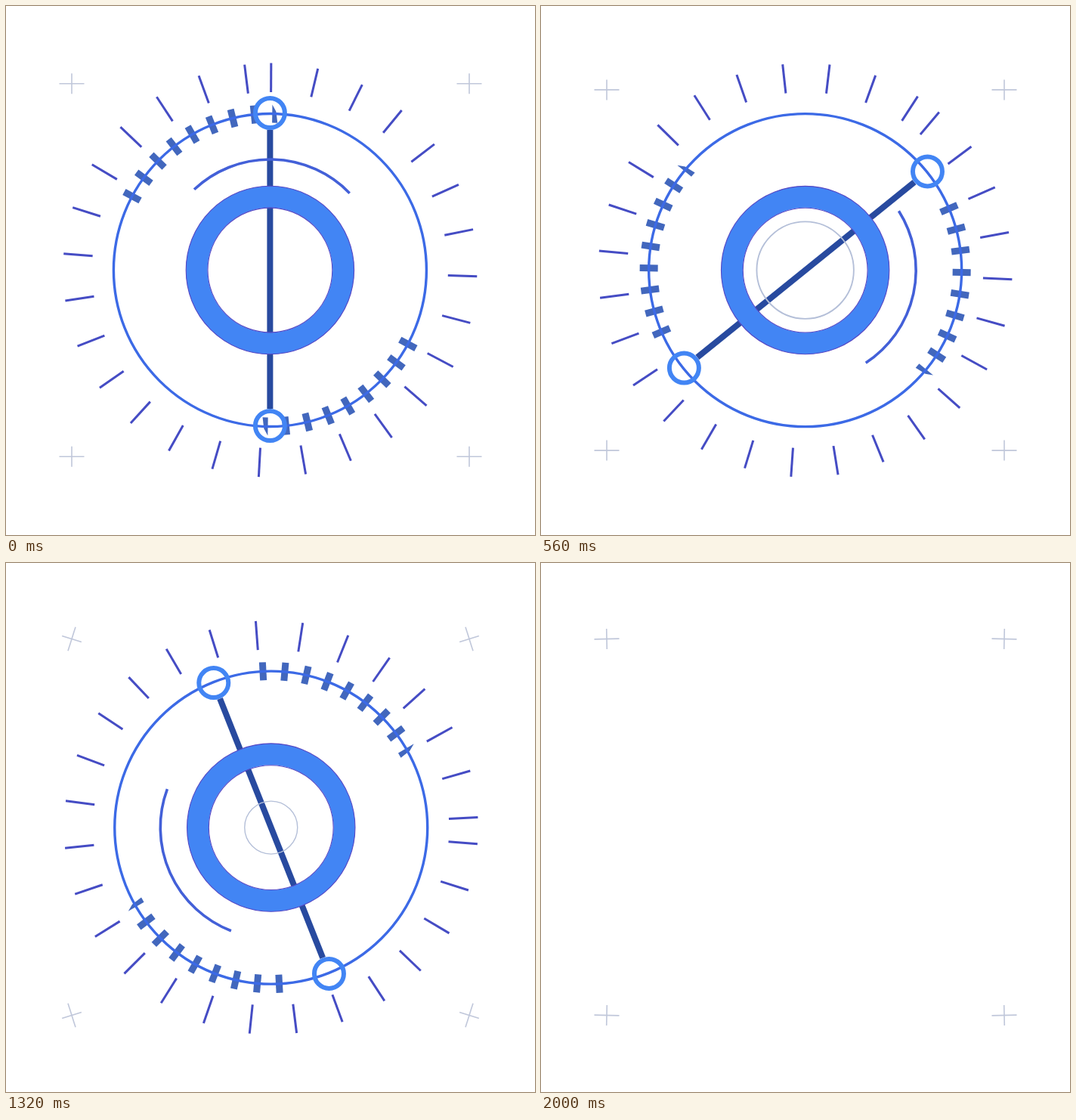
Animation, 700 px wide and 700 px high, one loop 2040 ms. Source, as an HTML page with a canvas:

```html
<!DOCTYPE html>
<html lang="en">
<head>
<meta charset="utf-8">
<title>Dial</title>
<style>
html, body { margin: 0; width: 100%; height: 100%; overflow: hidden; background: #fff; }
canvas { display: block; width: 700px; height: 700px; }
</style>
</head>
<body>
<canvas id="stage" width="700" height="700"></canvas>
<script>
const ctx = document.getElementById('stage').getContext('2d');
const LOOP = 2040, STEP = 40, END = 2000, SPIN = 1960;
const BLUE = '#4285f4', EDGE = '#5648c4', NAVY = '#284a9f', INDIGO = '#454cc4';
const LINE = '#3c6ae6', NOTCH = '#4267bd', PALE = '#b4bfd8';
const R = 207;
const PULSE = [[0, 0], [.2, 4], [.32, 35], [.4, 54], [.5, 64], [.64, 64.5], [.72, 22], [.78, 0], [1, 0]];

const rad = deg => (deg - 90) * Math.PI / 180;
const clamp = x => Math.min(1, Math.max(0, x));
const smooth = x => x * x * (3 - 2 * x);
const polar = (r, deg) => [r * Math.cos(rad(deg)), r * Math.sin(rad(deg))];

// Cubic ease with handles at (.335, 0) and (.39, 1)
function ease(x) {
  x = clamp(x);
  let lo = 0, hi = 1;
  for (let i = 0; i < 30; i++) {
    const s = (lo + hi) / 2, q = 1 - s;
    if (1.005 * q * q * s + 1.17 * q * s * s + s * s * s < x) lo = s; else hi = s;
  }
  return smooth(lo);
}

function lookup(knots, x) {
  const i = knots.findIndex(k => k[0] > x);
  const [x0, y0] = knots[i - 1], [x1, y1] = knots[i];
  return y0 + (y1 - y0) * (x - x0) / (x1 - x0);
}

function path(points, color, width) {
  ctx.beginPath();
  points.forEach(p => ctx.lineTo(...p));
  if (width) {
    ctx.strokeStyle = color;
    ctx.lineWidth = width;
    ctx.stroke();
  } else {
    ctx.fillStyle = color;
    ctx.fill();
  }
}

const spoke = (deg, r0, r1, color, width) => path([polar(r0, deg), polar(r1, deg)], color, width);

function arc(r, color, width, x = 0, y = 0, from = 0, to = 360) {
  ctx.beginPath();
  ctx.arc(x, y, r, rad(from), rad(to));
  ctx.strokeStyle = color;
  ctx.lineWidth = width;
  ctx.stroke();
}

// Upper and lower crosses trade places, then turn as mirror images
function crosses(t) {
  const shift = 249 * (1 - 2 * smooth(clamp((t + 25) / 640)));
  const turn = Math.PI * ease((t - 660) / 1465);
  for (const sx of [-1, 1]) for (const sy of [-1, 1]) {
    ctx.save();
    ctx.translate(350 + sx * 263, 349.5 + sy * shift);
    ctx.rotate(-sx * sy * turn);
    path([[-16.5, 0], [16.5, 0]], '#c0c7da', 1.6);
    path([[0, -13.5], [0, 13.5]], '#c0c7da', 1.6);
    ctx.restore();
  }
}

function notches(start) {
  for (let i = 0; i < 8; i++) spoke(start + i * 8, R - 12, R + 12, NOTCH, 9);
  const last = start + 62.6;
  path([polar(R - 12, last), polar(R + 12, last), polar(R + 3, last + 1.4), polar(R - 12, last + 2.1)], NOTCH);
}

function sweepAngle(t) {
  const q = t / 500, u = q % 1;
  return 90 * (Math.floor(q) + u + .8 * u ** 3 * (1 - u) + .015);
}

function dial(t) {
  const bar = 180 * ease(t / SPIN), sway = Math.cos(bar * Math.PI / 180);
  ctx.save();
  ctx.translate(350.1 - .7 * sway, 349.8 - .3 * sway);

  for (let i = 0; i < 28; i++) spoke(.3 + .0714 * t + i * 13.06, 235.5, 274, INDIGO, 3);

  const start = -61.8 - .0918 * t;
  notches(start);
  notches(start + 180);
  arc(R, LINE, 3.4);

  spoke(bar, -183.5, 185.5, NAVY, 8);
  for (const r of [R + 1, 1 - R]) arc(19.5, BLUE, 6, ...polar(r, bar));

  arc(97, BLUE, 28.5);
  arc(111.2, EDGE, 1.1);
  arc(82.4, EDGE, 1.1);

  const r = lookup(PULSE, t % 1000 / 1000);
  if (r > 1) arc(r, PALE, .8 + r / 60);

  const mid = sweepAngle(t);
  arc(146.5, '#4360d8', 3.6, 0, 0, mid - 44.6, mid + 44.6);
  ctx.restore();
}

function draw() {
  const t = Math.floor(performance.now() % LOOP / STEP) * STEP;
  ctx.clearRect(0, 0, 700, 700);
  crosses(t);
  if (t < END) dial(t);
  requestAnimationFrame(draw);
}
draw();
</script>
</body>
</html>
```
